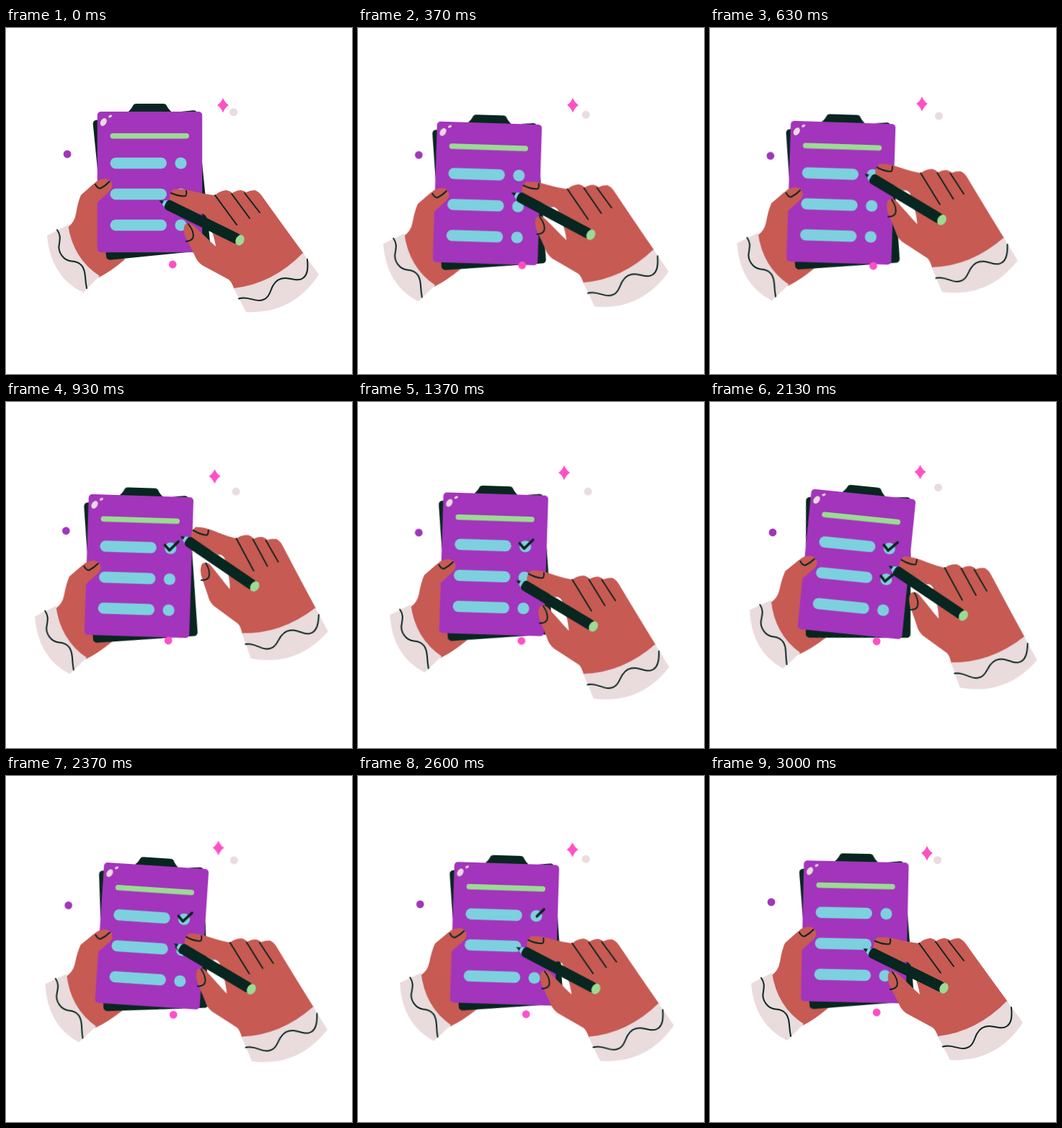
Animation of 480x480 px, one loop 3.03 s. Source, as an HTML page:

```html
<!DOCTYPE html>
<html lang="en">
<head>
<meta charset="utf-8">
<title>Checklist</title>
<style>
  html, body { margin: 0; width: 100%; height: 100%; overflow: hidden; background: #fff; }
  svg { display: block; width: 100vw; height: 100vh; }

  .dark { fill: #07261f; }
  .purple { fill: #a334bc; }
  .skin { fill: #c75a53; }
  .cloth { fill: #eadbdd; }
  .blue { fill: #7dd0de; }
  .green { fill: #9bdb93; }
  .pink { fill: #ff50c6; }
  .line, .tick { fill: none; stroke: #07261f; stroke-width: 2; stroke-linecap: round; stroke-linejoin: round; }
  .tick { stroke-width: 3.6; stroke-dasharray: 1 2; }

  .move { animation: 3030ms linear infinite; }
  .board { transform-origin: 199.5px 213.5px; animation-name: board; }
  .left { transform-origin: 57px 288px; animation-name: left; }
  .right { transform-origin: 324.5px 294.5px; animation-name: right; }
  .star { animation-name: star; }
  .pale-dot { animation-name: pale-dot; }
  .purple-dot { animation-name: purple-dot; }
  .pink-dot { animation-name: pink-dot; }
  .tick1 { animation-name: tick1; }
  .tick2 { animation-name: tick2; }

  @keyframes board {
    0% { transform: none; animation-timing-function: ease-in-out; }
    12.21% { transform: translate(-20px, 15.8px) rotate(1.8deg); }
    30.69% { transform: translate(-15px, 14px) rotate(1.8deg); }
    45.21% { transform: translate(-11.2px, 11.5px) rotate(1.8deg); }
    53.8% { transform: translate(-9.5px, 12px) rotate(2.4deg); animation-timing-function: ease-in-out; }
    70.3% { transform: translate(4px, 11.3px) rotate(5.8deg); }
    75.25% { transform: translate(2.5px, 9.5px) rotate(4.6deg); }
    85.81% { transform: translate(4px, 5.3px) rotate(1.8deg); }
    99.01% { transform: translate(1.5px, 2.8px) rotate(1.3deg); }
    100% { transform: none; }
  }
  @keyframes left {
    0%, 99.01%, 100% { transform: none; }
    0% { animation-timing-function: ease-in-out; }
    12.21% { transform: translate(-22px, 11.5px) rotate(1deg); }
    30.69% { transform: translate(-17px, 9.5px) rotate(1deg); }
    45.21% { transform: translate(-13px, 7.5px) rotate(1deg); }
    53.8% { transform: translate(-11px, 7px) rotate(1.2deg); animation-timing-function: ease-in-out; }
    70.3% { transform: translate(-2px, .5px) rotate(2.7deg); }
    75.25% { transform: translate(-4px, 1px) rotate(2.5deg); }
    85.81% { transform: translate(1px, -1px) rotate(2deg); }
  }
  @keyframes right {
    0%, 99.01%, 100% { transform: none; }
    12.21% { transform: translate(-1.5px, -7.5px) rotate(1.8deg); }
    17.49% { transform: translate(-2.5px, -15.5px) rotate(2.8deg); }
    21.45% { transform: translate(-3px, -30.5px) rotate(5deg); }
    24.09% { transform: translate(3.5px, -23.5px) rotate(5.5deg); }
    28.05% { transform: translate(13.5px, -32.5px) rotate(7.2deg); }
    30.69% { transform: translate(20.5px, -38.5px) rotate(8deg); }
    33% { transform: translate(21px, -39px) rotate(8deg); animation-timing-function: ease-in-out; }
    45.21% { transform: translate(2px, 17px) rotate(4.7deg); }
    48.51% { transform: translate(4px, 22.5px) rotate(5.2deg); }
    51.49% { transform: translate(12.5px, 27.5px) rotate(6deg); }
    56.11% { transform: translate(30.5px, 13.5px) rotate(7.6deg); }
    59.41% { transform: translate(35px, 5.5px) rotate(8.2deg); }
    70.3% { transform: translate(27px, 2px) rotate(7.6deg); animation-timing-function: ease-in-out; }
    85.81% { transform: translate(5.5px, 1px) rotate(1.5deg); }
  }
  @keyframes star {
    0%, 99.01%, 100% { transform: none; }
    12.21% { transform: translate(-3px, 0); }
    30.69% { transform: translate(-11.5px, -4px); }
    45.21% { transform: translate(-15px, -9px); }
    56% { transform: translate(-14px, -11px); }
    70.3% { transform: translate(-9.5px, -10px); }
    85.81% { transform: translate(-3.5px, -5px); }
  }
  @keyframes pale-dot {
    0%, 99.01%, 100% { transform: none; }
    12.21% { transform: translate(.5px, 3.5px); }
    30.69% { transform: translate(3.5px, 7.5px); }
    45.21% { transform: translate(3.5px, 7.5px); }
    70.3% { transform: translate(1px, 2px); }
    85.81% { transform: translate(.5px, -1.5px); }
  }
  @keyframes purple-dot {
    0%, 99.01%, 100% { transform: none; }
    12.21% { transform: translate(-.7px, 1.2px); }
    30.69% { transform: translate(-1.7px, 3.7px); }
    45.21% { transform: translate(-.7px, 6.2px); }
    70.3% { transform: translate(2px, 6px); }
    85.81% { transform: translate(1.2px, 3px); }
  }
  @keyframes pink-dot {
    0%, 99.01%, 100% { transform: none; }
    12.21% { transform: translate(-3.5px, 1.3px); }
    30.69% { transform: translate(-6px, 3px); }
    45.21% { transform: translate(-4.5px, 3.4px); }
    70.3% { transform: translate(0, 4px); }
    85.81% { transform: translate(2px, 2.5px); }
  }
  @keyframes tick1 {
    0%, 21.45% { stroke-dashoffset: 1.2; }
    28.05%, 81% { stroke-dashoffset: 0; }
    93%, 100% { stroke-dashoffset: -1.2; }
  }
  @keyframes tick2 {
    0%, 48.51% { stroke-dashoffset: 1.2; }
    56.11%, 81% { stroke-dashoffset: 0; }
    93%, 100% { stroke-dashoffset: -1.2; }
  }
</style>
</head>
<body>
<svg viewBox="0 0 480 480">
  <defs>
    <g id="row">
      <rect class="blue" x="144.5" y="-7.7" width="78.5" height="15.4" rx="7.7"/>
      <circle class="blue" cx="242.5" r="8.1"/>
    </g>
  </defs>

  <circle class="purple move purple-dot" cx="85" cy="175" r="5.4"/>

  <!-- palm behind the board -->
  <g class="move left">
    <path class="skin" d="M85 277Q95 270 97 258Q100 240 104 232L122 216H150V300L165 321Q145 338 129 346Q88 320 85 277Z"/>
    <path class="cloth" d="M57 288L86 273Q93 320 130 344L107 367Q62 345 57 288Z"/>
    <path class="line" d="M71 280C76 287 75 292 74 299C71 312 81 323 91 323.5C105 324 109 333 110 345Q110.5 353 112 361"/>
  </g>

  <g class="move board">
    <rect class="dark" x="129.5" y="120.5" width="145.3" height="195" rx="5" transform="rotate(-5.7 201.7 218)"/>
    <path class="dark" d="M167 118Q173 114 176 108Q177 105 181 105H218Q222 105 223 108Q226 114 232 118Z"/>
    <rect class="purple" x="126.7" y="116" width="145.5" height="195.3" rx="5"/>
    <ellipse class="cloth" cx="135.3" cy="130.5" rx="4" ry="5.8" transform="rotate(30 135.3 130.5)"/>
    <ellipse class="cloth" cx="144.5" cy="122.5" rx="2.7" ry="1.6" transform="rotate(-25 144.5 122.5)"/>
    <rect class="green" x="144.5" y="146" width="109.5" height="7.4" rx="3.7"/>
    <use href="#row" y="187.5"/>
    <use href="#row" y="230.5"/>
    <use href="#row" y="273.5"/>
    <path class="move tick tick1" pathLength="1" d="M234.5 183.5L241 190.5L253 178"/>
    <path class="move tick tick2" pathLength="1" d="M234.5 226.5L241 233.5L253 221"/>
  </g>

  <!-- thumb in front of the board -->
  <g class="move left">
    <path class="skin" d="M104 232L122 216Q128 209 138 209Q147 211 147 217Q148 222 143 227L127 242Q115 252 100 255Z"/>
    <path class="line" d="M124 217Q128 224 132 222Q138 219 143.5 213"/>
  </g>

  <circle class="pink move pink-dot" cx="231.2" cy="328" r="5.4"/>
  <circle class="cloth move pale-dot" cx="315.6" cy="116.7" r="5.5"/>
  <path class="pink move star" d="M301 97Q304 104 309 107Q304 110 301 117.5Q298 110 293 107Q298 104 301 97Z"/>

  <g class="move right">
    <path class="skin" d="M232 224Q245 222 262 227Q278 231 290 232Q296 226 306 225Q311 226 314 229Q320 225 326 225Q331 226 333 228Q339 225 345 225Q351 227 355 233Q385 275 413 313Q372 358 317 363Q313 352 309 349L272 329Q265 324 262 316L249 290Q245 280 248 273Q253 269 259 273L274 287Q283 296 291 303Q289 290 285 281L278 262Q274 256 268 258L228 240Q225 232 232 224Z"/>
    <path class="cloth" d="M412 312L434 342Q398 397 333 394L316 361Q370 355 412 312Z"/>
    <path class="line" d="M323 375.5C334 372 341 378 352 378C365 377 366 366 370 358C376 347 384 346 392 347.5C400 349 406 351 412 347C419 342 419 332 418 321"/>
    <path class="line" d="M290 232L320 273M313 230L338 264M331 229L352 256"/>
    <path class="line" d="M229 229Q240 234 249 233Q251 231 250 226M253 272C257 277 261 285 259.5 291Q257 295.5 250 296"/>
    <g transform="translate(216 241) rotate(26.2)">
      <path class="dark" d="M-4 0L4 -3.5V3.5Z"/>
      <path class="blue" d="M2 -3L10 -6.8V6.8L2 3Z"/>
      <rect class="dark" x="6" y="-7.4" width="114" height="14.8" rx="5"/>
      <ellipse class="green" cx="121" rx="5.8" ry="7.6"/>
    </g>
  </g>
</svg>
</body>
</html>
```
